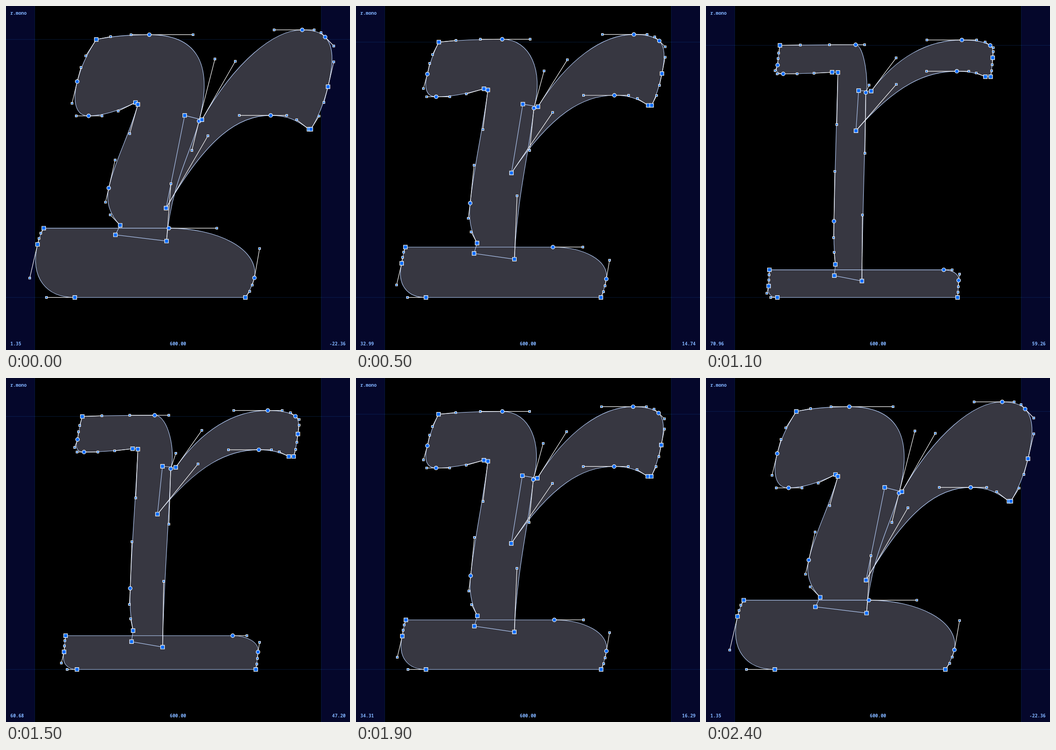
Write an HTML page with a canvas that moves like this. It is 748x748 px and loops after 2.5 s.

```html
<!DOCTYPE html>
<html lang="en">
<head>
<meta charset="utf-8">
<title>Glyph interpolation</title>
<style>
html, body { margin: 0; width: 100%; height: 100%; overflow: hidden; background: #000; }
canvas { display: block; }
</style>
</head>
<body>
<canvas id="stage" width="748" height="748"></canvas>
<script>
const ctx = document.getElementById('stage').getContext('2d');
const SIZE = 748, UNIT = SIZE / 720, ADVANCE = 600;
const BLUE = '#0a6cff', WHITE = '#fff';

// Font units, y up from the baseline, to stage pixels
const px = x => (x + 60) * UNIT;
const py = y => (610 - y) * UNIT;
const toStage = ([x, y]) => [px(x), py(y)];

// An outline made of lines and cubics. Handles are fractions of the
// segment's width and height, so they follow the nodes.
class Outline {
  constructor(start) {
    this.start = this.last = start;
    this.segs = [];
  }
  line(shape, to) {
    return this.add(shape, [to]);
  }
  curve(shape, to, out = [.24, .37], into = [.52, .69]) {
    const place = h => h.map((f, i) => this.last[i] + f * (to[i] - this.last[i]));
    return this.add(shape, [place(out), place(into), to]);
  }
  add(shape, pts) {
    this.segs.push({ shape, from: toStage(this.last), pts: pts.map(toStage) });
    this.last = pts.at(-1);
    return this;
  }
}

// v(bold, light) blends one measure for the current weight
function foot(v) {
  const top = v(145, 46), start = [v(19, 80), top];
  return new Outline(start)
    .line('o', [v(281, 459), top])
    .curve('o', [v(460, 470), v(41, 35)], [.56, 0], [1.06, .41])
    .curve('s', [v(441, 470), 0])
    .line('s', [v(84, 90), 0])
    .curve('s', [v(6, 80), top - 34], [.76, 0], [1.21, .365])
    .curve('s', start);
}

function stem(v) {
  const start = [v(129, 90), v(540, 526)];
  const shoulder = [v(344, 265), v(369, 437)];
  const lift = (v(499, 437) - v(550, 526)) / (shoulder[1] - v(550, 526));
  return new Outline(start)
    .curve('o', [v(240, 255), v(550, 526)], [.27, .6], [.655, 1])
    .curve('o', shoulder, [.88, 0], [1.32, lift])
    .curve('s', [v(276, 265), v(118, 23)], [.22, v(.244, .333)], [.865, v(.522, .667)])
    .line('s', [v(169, 214), v(131, 34)])
    .line('s', [v(179, 215), v(151, 58)])
    .curve('o', [v(155, 215), v(229, 150)], [.87, .28], [1.28, .62])
    .curve('s', [216, v(404, 480)], [.22, .335], [.72, .65])
    .line('s', [v(211, 203), v(408, 480)])
    .curve('o', [v(113, 100), v(380, 480)], [.37, .64], [.715, 1])
    .curve('o', [v(89, 90), v(452, 491)], [1.08, 0], [1.45, .365])
    .curve('s', start, [.2, .335], [.45, .61]);
}

function arm(v) {
  const start = [v(314, 252), v(381, 440)];
  const tip = v(352, 477), bulge = v(3, 1);
  return new Outline(start)
    .line('s', [v(350, 277), v(372, 440)])
    .curve('o', [v(560, 464), v(560, 536)], [v(.333, .267), .65], [v(.72, .6), 1])
    .curve('o', [v(608, 525), v(545, 525)], [.52, 0], [.82, .38])
    .curve('s', [v(614, 530), v(441, 510)], [bulge, .18], [bulge, .5])
    .curve('s', [v(578, 530), tip])
    .line('s', [v(574, 518), tip])
    .curve('o', [v(494, 461), v(381, 486)], [.32, .685], [.58, 1])
    .curve('s', [v(275, 251), v(187, 371)], [.3, 0], [.6, .22])
    .line('s', start);
}

function trace({ start, segs }) {
  ctx.moveTo(...toStage(start));
  for (const { pts } of segs)
    pts.length > 1 ? ctx.bezierCurveTo(...pts.flat()) : ctx.lineTo(...pts[0]);
  ctx.closePath();
}

function line(a, b) {
  ctx.beginPath();
  ctx.moveTo(...a);
  ctx.lineTo(...b);
  ctx.stroke();
}

function mark([x, y], shape, size) {
  ctx.beginPath();
  if (shape === 'o') ctx.arc(x, y, size / 2, 0, 7);
  else ctx.rect(x - size / 2, y - size / 2, size, size);
  ctx.fill();
  ctx.stroke();
}

function label(text, x, y, align) {
  ctx.textAlign = align;
  ctx.fillText(text, x, y);
}

function guides(height) {
  const left = px(0), right = px(ADVANCE);
  ctx.fillStyle = '#000';
  ctx.fillRect(0, 0, SIZE, SIZE);
  ctx.fillStyle = '#05072b';
  ctx.fillRect(0, 0, left, SIZE);
  ctx.fillRect(right, 0, left, SIZE);
  ctx.strokeStyle = '#124a9c';
  ctx.lineWidth = 1;
  ctx.setLineDash([1, 2]);
  for (const x of [left, right]) line([x, 0], [x, SIZE]);
  for (const y of [py(height), py(0)]) line([0, y], [SIZE, y]);
  ctx.setLineDash([]);
}

function draw(now) {
  const step = Math.floor(now / 100) % 25;
  const weight = Math.min(step / 12.5, (24 - step) / 12);
  const v = (bold, light) => bold + (light - bold) * weight;
  const glyph = [foot, stem, arm].map(part => part(v));
  const segs = glyph.flatMap(part => part.segs.reverse());
  glyph.forEach(part => part.segs.reverse());

  guides(v(540, 526));

  ctx.beginPath();
  glyph.forEach(trace);
  ctx.fillStyle = '#373741';
  ctx.fill();
  ctx.strokeStyle = '#b9d2ff';
  ctx.lineWidth = 1.1;
  ctx.stroke();

  ctx.strokeStyle = WHITE;
  ctx.lineWidth = 1.2;
  ctx.fillStyle = BLUE;
  const curves = segs.filter(seg => seg.pts.length > 1);
  for (const { from, pts } of curves) {
    line(from, pts[0]);
    line(pts[1], pts[2]);
  }
  for (const { pts } of curves)
    for (const handle of pts.slice(0, 2)) mark(handle, 's', 4.2);
  for (const { shape, pts } of segs) mark(pts.at(-1), shape, 8.2);

  ctx.fillStyle = '#80b2ff';
  ctx.font = '600 9.8px "Noto Sans Mono", "DejaVu Sans Mono", monospace';
  label('r.mono', 9.5, 19, 'left');
  label(v(1.35, 80.45).toFixed(2), 9.5, 738, 'left');
  label(ADVANCE.toFixed(2), SIZE / 2, 738, 'center');
  label(v(-22.36, 70.39).toFixed(2), 738.5, 738, 'right');
}

function tick(now) {
  draw(now);
  requestAnimationFrame(tick);
}
draw(0);
requestAnimationFrame(tick);
</script>
</body>
</html>
```
